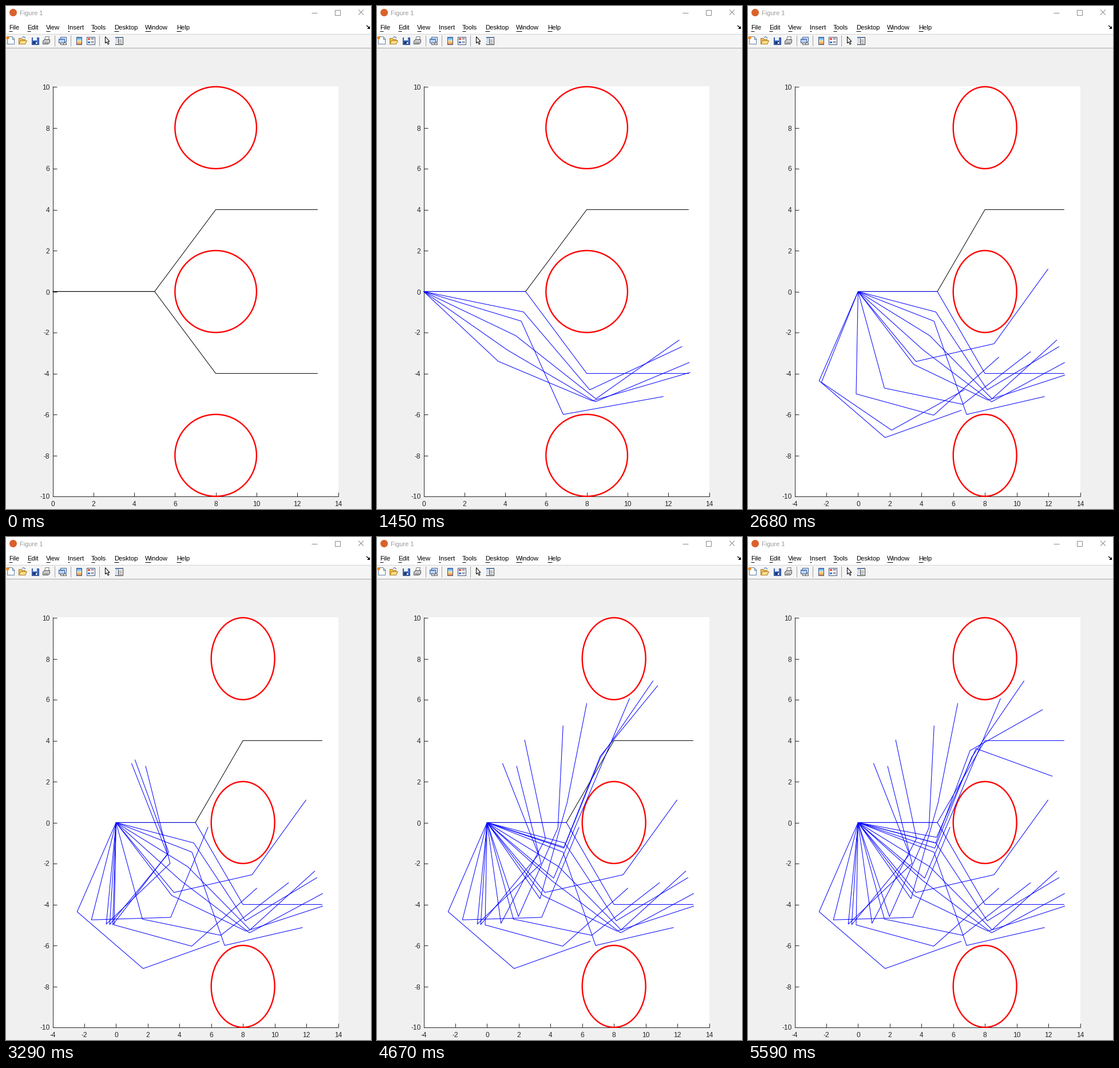
Recreate the animation shown at these times as a matplotlib script. Size 638x878 px, loop 6140 ms.

```python
import numpy as np
import matplotlib.pyplot as plt
from matplotlib.animation import FuncAnimation
from matplotlib.collections import LineCollection
from matplotlib.patches import Circle, Polygon, Rectangle

W, H, DPI = 638, 878, 64
PX = 72 / DPI  # points per pixel
LOOP, INTERVAL = 6140, 20
FIRST_STEP, STEP_MS, STEPS = 292, 76.67, 70
INK, BLUE, RED = "#262626", "#0000ff", "#ff0000"
LEFT, RIGHT, TOP, BOTTOM, MID_Y, UNIT_Y = 81.5, 580.5, 140, 855.5, 498.4, 35.75
LINK = 5

# Search tree of arm poses: parent index, then three joint angles in degrees
TREE = [
    (0, 0, -53.13, 53.13), (0, -11.5, -38, 74.5), (0, -16.8, -48.9, 75.8),
    (1, -25.5, -12.6, 73.2), (3, -34.8, 4.4, 53), (4, -45.4, 25, 34.6),
    (5, -43.1, 53.1, 37), (6, -70.6, 61.5, 40.1), (7, -91.4, 79.4, 46.6),
    (8, -119.4, 85.7, 49.2), (9, -108.1, 109.5, 60.5), (10, -97.1, 133.5, 71.6),
    (11, -94.6, 137.8, 73.8), (12, -79.9, 135.8, 49.3), (13, -66.7, 126.8, 26.2),
    (14, -48.1, 118.1, 5.7), (15, -32.9, 94.3, 0), (16, -14.5, 76.9, -13.9),
    (17, -11.5, 75.9, -40.8), (18, -8.3, 68.4, -75.8), (19, 0, 53.13, -53.13),
]
PARENT = [row[0] for row in TREE]
POSE = np.array([row[1:] for row in TREE], float)
GOAL = len(TREE) - 1

# Edges of the tree grown after a given number of steps
PACE_STEP = [1, 7, 16, 27, 34, 38.9, 39.5, 40, 43, 52, 58, 60, 69, 70]
PACE_EDGE = [.3, 2.42, 4.77, 7.86, 9.69, 11, 12, 12.15, 13.15, 15.48, 17.2, 17.65, 19.87, 20]

fig = plt.figure(figsize=(W / DPI, H / DPI), dpi=DPI, facecolor="#f0f0f0")
ax = fig.add_axes([0, 0, 1, 1])
ax.set_xlim(0, W)
ax.set_ylim(H, 0)
ax.axis("off")


def rect(x, y, w, h, fill, edge="none", lw=1):
    ax.add_patch(Rectangle((x, y), w, h, fc=fill, ec=edge, lw=lw * PX))


def poly(points, fill, edge="none", lw=1):
    ax.add_patch(Polygon(points, closed=True, fc=fill, ec=edge, lw=lw * PX))


def line(points, color=INK, lw=1):
    x, y = np.transpose(points)
    return ax.plot(x, y, color=color, lw=lw * PX, solid_capstyle="butt")[0]


def label(x, y, text, size=12, color=INK, ha="left"):
    return ax.text(x, y, text, fontsize=size * PX, color=color, ha=ha,
                   va="baseline", family="Liberation Sans")


def draw_window():
    rect(0, 0, W, 48, "white")
    rect(0, 48, W, 25, "#f5f5f5")
    line([(0, 48.5), (W, 48.5)], "#d8d8d8")
    line([(0, 72.5), (W, 72.5)], "#a8a8a8")
    ax.add_patch(Circle((12.5, 11.5), 6.5, fc="#d9622b", ec="none"))
    label(24, 16, "Figure 1", 11, "#999999")
    line([(534, 11.5), (544, 11.5)], "#8a8a8a")
    rect(574.5, 6.5, 9, 9, "none", "#8a8a8a")
    line([(616, 6.5), (625, 15.5)], "#8a8a8a")
    line([(616, 15.5), (625, 6.5)], "#8a8a8a")
    menus = [(5, "File", 6), (37, "Edit", 6), (70, "View", 7), (108, "Insert", 3),
             (149, "Tools", 6), (189, "Desktop", 8), (243, "Window", 10), (298, "Help", 8)]
    for x, text, width in menus:
        label(x, 41, text, 11.2, "black")
        line([(x, 43.5), (x + width, 43.5)], "black")
    line([(630, 34), (635, 38)], "black", 1.3)
    poly([(636, 34.5), (636, 39.5), (631, 39.5)], "black")


def draw_toolbar():
    for x in (84.5, 112.5, 162.5):
        line([(x, 51), (x, 70)], "#a0a0a0")
    # New, open
    poly([(2.5, 53.5), (10.5, 53.5), (14.5, 57.5), (14.5, 66.5), (2.5, 66.5)], "white", "#5f7f9f")
    line([(10.5, 53.5), (10.5, 57.5), (14.5, 57.5)], "#5f7f9f")
    ax.add_patch(Circle((3, 55.5), 2.7, fc="#f08a24", ec="none"))
    poly([(22.5, 66.5), (22.5, 56.5), (27, 56.5), (28.5, 58.5), (33.5, 58.5), (33.5, 66.5)],
         "#f2c04c", "#a87820")
    poly([(22.5, 66.5), (25.5, 60.5), (36.5, 60.5), (33.5, 66.5)], "#ffe08a", "#b07a20")
    line([(28, 55), (31, 53.5), (34, 56)], "#3f68a8")
    # Save, print
    rect(44.5, 54.5, 12, 12, "#4470c4", "#27438a")
    rect(47, 55, 7, 5, "#eaf2ff")
    rect(47, 62, 7, 4, "#20346a")
    rect(52, 63, 1.5, 3, "white")
    poly([(67.5, 59.5), (69, 53.5), (75.5, 53.5), (74, 59.5)], "white", "#777777")
    poly([(64.5, 61.5), (67.5, 58.5), (76.5, 58.5), (76.5, 63.5), (73.5, 66.5), (64.5, 66.5)],
         "#c8c8cc", "#555555")
    line([(66, 63.5), (73, 63.5)], "#666666")
    # Link plot
    rect(94.5, 53.5, 10, 8, "#dce9fb", "#355a94")
    rect(91.5, 56.5, 10, 7, "#b9d1f3", "#355a94")
    rect(92, 57, 9, 2, "#4f79b8")
    for x in (94.5, 99.5):
        rect(x, 63.5, 5, 3, "none", "#555555")
    # Colorbar and legend
    for i, color in enumerate(["#5b8fe0", "#6fb5ee", "#a8d6e6", "#f3dfa0", "#f7bd70", "#ee8d50"]):
        rect(122.5, 53.5 + i * 2.2, 9, 2.4, color)
    rect(122.5, 53.5, 9, 13, "none", "#3b5580")
    rect(140.5, 53.5, 14, 13, "white", "#3b5580")
    for y, color in ((55.5, "#e0402c"), (61.5, "#3f6fd0")):
        rect(142.5, y, 4, 3.5, color)
        line([(148, y + .5), (153, y + .5)], "#444444")
        line([(148, y + 2.5), (153, y + 2.5)], "#888888")
    # Pointer and inspector
    poly([(173.5, 53.5), (173.5, 65), (176, 62.5), (178.2, 67), (180, 66), (178, 62), (181, 62)],
         "white", "black")
    rect(190.5, 53.5, 13, 13, "white", "#333333")
    rect(191, 54, 12, 2, "#5878a8")
    rect(191, 56, 4, 10, "#cfdcf0")
    line([(195.5, 56), (195.5, 66)], "#333333")
    for y in (58.5, 61.5, 64.5):
        line([(197, y), (202, y)], "#555555")


def to_y(y):
    return MID_Y - UNIT_Y * np.asarray(y, float)


def to_x(x, xmin):
    return LEFT + (np.asarray(x, float) - xmin) * (RIGHT - LEFT) / (14 - xmin)


def joints(pose):
    """Four points of the arm for joint angles in degrees."""
    heading = np.radians(np.cumsum(pose))
    steps = LINK * np.column_stack([np.cos(heading), np.sin(heading)])
    return np.vstack([[0, 0], np.cumsum(steps, axis=0)])


draw_window()
draw_toolbar()
rect(82, TOP, 499, 716, "white")
line([(LEFT, TOP), (LEFT, 856)])
line([(LEFT, BOTTOM), (581, BOTTOM)])
for v in range(-10, 11, 2):
    y = np.floor(to_y(v) - .1) + .5
    line([(LEFT, y), (LEFT + 7, y)])
    label(76.5, y + 5, str(v), ha="right")

x_ticks = [(v, line([(0, 849), (0, BOTTOM)]), label(0, 873, str(v), ha="center"))
           for v in range(-4, 15, 2)]
start_line = line([(0, 0)], "black")
goal_line = line([(0, 0)], "black")
angle = np.linspace(0, 2 * np.pi, 121)
rings = [(cy, line([(0, 0)], RED, 2.4)) for cy in (8, 0, -8)]
arms = LineCollection([], colors=BLUE, linewidths=PX, zorder=3)
ax.add_collection(arms)


def visible_arms(step):
    if step == 0:
        return [], 0
    grown = np.interp(step, PACE_STEP, PACE_EDGE)
    done = int(grown)
    poses = list(POSE[:done + 1])
    if done < GOAL:
        origin, target = POSE[PARENT[done + 1]], POSE[done + 1]
        poses.append(origin + (grown - done) * (target - origin))
    return [joints(p) for p in poses], done


def update(frame):
    t = frame * INTERVAL + INTERVAL / 2
    step = int(np.clip((t - FIRST_STEP) // STEP_MS + 1, 0, STEPS))
    shapes, done = visible_arms(step)
    reach = min((s[:, 0].min() for s in shapes), default=0)
    xmin = -2 * int(np.ceil(max(0, -reach) / 2 - 1e-9))

    arms.set_segments([np.column_stack([to_x(s[:, 0], xmin), to_y(s[:, 1])]) for s in shapes])
    for artist, pose, shown in ((start_line, POSE[0], step == 0),
                                (goal_line, POSE[GOAL], done < GOAL)):
        x, y = joints(pose).T
        artist.set_data(to_x(x, xmin), to_y(y))
        artist.set_visible(shown)
    for cy, ring in rings:
        ring.set_data(to_x(8 + 2 * np.cos(angle), xmin), to_y(cy + 2 * np.sin(angle)))
    for v, mark, text in x_ticks:
        x = float(to_x(v, xmin))
        mark.set_xdata([x, x])
        text.set_x(x)
        mark.set_visible(v >= xmin)
        text.set_visible(v >= xmin)
    return [arms]


def reset():
    return update(0)


anim = FuncAnimation(fig, update, frames=LOOP // INTERVAL, init_func=reset,
                     interval=INTERVAL, repeat=True, repeat_delay=0, blit=False)
plt.show()
```
